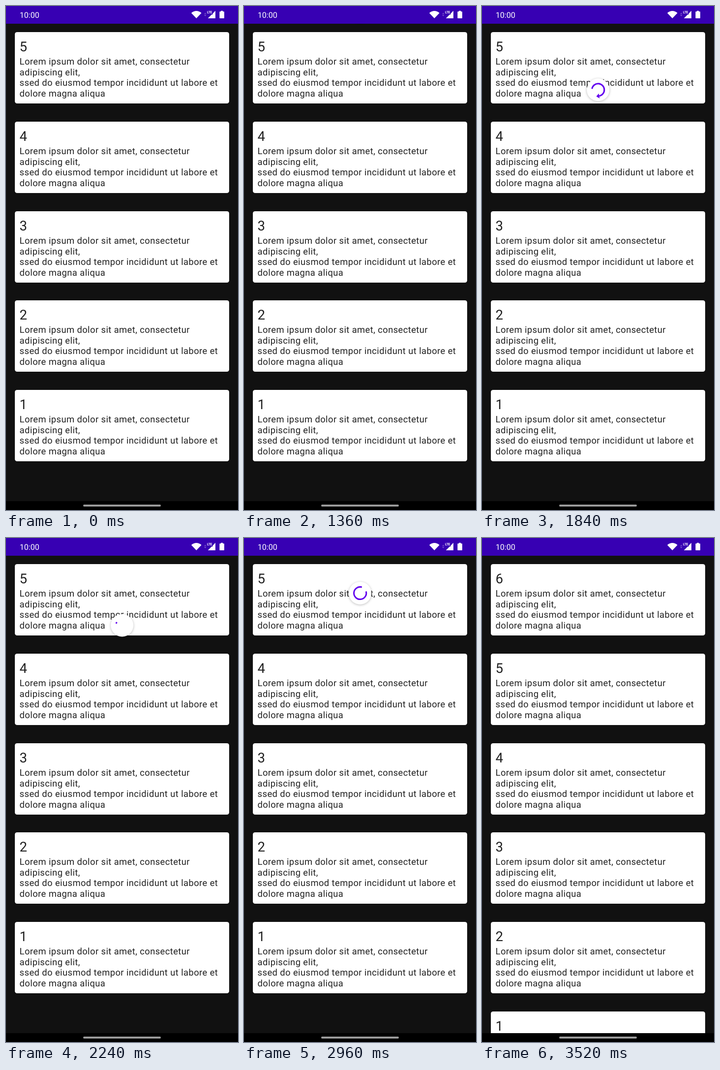
These frames come from a looping animation (472 px wide and 1024 px high, 4.56 s). An HTML page:

```html
<!DOCTYPE html>
<html lang="en">
<head>
<meta charset="utf-8">
<title>Pull to refresh</title>
<style>
  html, body { margin: 0; width: 100%; height: 100%; overflow: hidden; background: #111; }
  svg { display: block; width: 100%; height: 100%; font-family: Roboto, sans-serif; }
  text { text-rendering: geometricPrecision; }
  .digit { font-size: 27.55px; }
  .line { font-size: 18.37px; letter-spacing: .42px; }
  .card { fill: #212121; }
  .card rect { fill: #fff; }
  .disc { fill: #fff; filter: drop-shadow(0 1px 2.5px rgba(0, 0, 0, .27)); }
</style>
</head>
<body>
<svg viewBox="0 0 472 1024">
  <clipPath id="content"><rect y="36" width="472" height="970"/></clipPath>
  <rect width="472" height="1024" fill="#111"/>
  <g clip-path="url(#content)">
    <g id="list"></g>
    <g id="indicator">
      <circle class="disc" r="23"/>
      <g id="ring">
        <path id="arc" fill="none" stroke="#6200ee" stroke-width="3"/>
        <path id="head" d="M-5 0H5L0 6Z" fill="#6200ee"/>
      </g>
    </g>
  </g>
  <rect width="472" height="36" fill="#3700b3"/>
  <g fill="#fff">
    <text x="27.8" y="23.7" font-size="16.07">10:00</text>
    <path d="M377 14.2Q387.3 6 397.6 14.2L387.3 25Z"/>
    <path d="M403 16.4l2.3-3 2.3 3zM403 18l2.3 3 2.3-3z" opacity=".3"/>
    <path d="M426 9.8V25H410.8L418.6 17.2H420.6V15.2Z"/>
    <text x="409" y="15.4" font-size="6.8" font-weight="700" letter-spacing="-.3">LTE</text>
    <path d="M437.2 9.8h4v1.4h2a.8 .8 0 0 1 .8 .8v12.2a.8 .8 0 0 1-.8 .8h-8a.8 .8 0 0 1-.8-.8v-12.2a.8 .8 0 0 1 .8-.8h2z"/>
  </g>
  <rect y="1006" width="472" height="18" fill="#000"/>
  <rect x="157" y="1013" width="158" height="4" rx="2" fill="#9b9b9b"/>
</svg>
<script>
const LOOP = 4560, DATA_AT = 3280, SIXTH_AT = 3320;
const PULL_END = 2240, SPIN_START = 2276, HIDE_START = 3305, HIDE_END = 3505;
const REST_Y = 112, PULL_Y = 178, RADIUS = 12.6, CYCLE = 1332;
// [time, centre y] of the dragged indicator
const PULL = [[1360, 8], [1400, 28], [1480, 68], [1560, 103], [1680, 141], [1800, 166], [1880, 174.5], [2040, PULL_Y]];
const LINES = ['Lorem ipsum dolor sit amet, consectetur', 'adipiscing elit,',
  'ssed do eiusmod tempor incididunt ut labore et', 'dolore magna aliqua'];

const $ = id => document.getElementById(id);
const list = $('list'), indicator = $('indicator'), ring = $('ring'), arc = $('arc'), head = $('head');
const clamp = v => Math.min(1, Math.max(0, v));

list.innerHTML = Array.from({ length: 6 }, (_, i) => `
  <g class="card" transform="translate(0 ${Math.round(53.4 + i * 181.68)})">
    <rect x="18" width="436" height="145" rx="4.6"/>
    <text class="digit" x="27.6" y="38.8"></text>
    ${LINES.map((s, n) => `<text class="line" x="27.6" y="${66.3 + n * 21.45}">${s}</text>`).join('')}
  </g>`).join('');
const cards = [...list.children];
const digits = [...list.querySelectorAll('.digit')];

function track(points, t) {
  const i = points.findIndex(p => p[0] > t);
  if (i < 0) return points[points.length - 1][1];
  if (i === 0) return points[0][1];
  const [t0, a] = points[i - 1], [t1, b] = points[i];
  return a + (b - a) * (t - t0) / (t1 - t0);
}

// cubic-bezier(.4, 0, .2, 1), solved by bisection
function standardEase(x) {
  let lo = 0, hi = 1;
  for (let i = 0; i < 18; i++) {
    const s = (lo + hi) / 2, r = 1 - s;
    if (1.2 * r * r * s + .6 * r * s * s + s ** 3 < x) lo = s; else hi = s;
  }
  return lo * lo * (3 - 2 * lo);
}

function drawArc(start, sweep) {
  const point = deg => {
    const a = deg * Math.PI / 180;
    return `${(RADIUS * Math.cos(a)).toFixed(3)} ${(RADIUS * Math.sin(a)).toFixed(3)}`;
  };
  arc.setAttribute('d', `M${point(start)}A${RADIUS} ${RADIUS} 0 ${+(sweep > 180)} 1 ${point(start + sweep)}`);
}

function drawPull(y) {
  const start = 158 + (y - 141) * 1.08;
  const sweep = 250 * clamp(y / 110);
  drawArc(start, sweep);
  arc.setAttribute('stroke-linecap', 'butt');
  head.setAttribute('transform', `rotate(${start + sweep}) translate(${RADIUS} 0)`);
  head.style.display = '';
  ring.style.opacity = .3 + .7 * clamp((y - 95) / 25);
}

function drawSpinner(t) {
  const time = Math.max(0, t - SPIN_START), phase = time / CYCLE;
  const tail = 290 * standardEase(clamp(phase * 2 - 1));
  const tip = 290 * standardEase(clamp(phase * 2));
  drawArc(203 + 286 * phase + tail, Math.max(1, tip - tail));
  arc.setAttribute('stroke-linecap', 'square');
  head.style.display = 'none';
  ring.style.opacity = 1;
}

function render(t) {
  const top = t < DATA_AT ? 5 : 6;
  digits.forEach((d, i) => { d.textContent = top - i; });
  cards[5].style.display = t < SIXTH_AT ? 'none' : '';

  const visible = t > 1360 && t < HIDE_END;
  indicator.style.display = visible ? '' : 'none';
  if (!visible) return;
  let y;
  if (t < PULL_END) {
    y = track(PULL, t);
    drawPull(y);
  } else {
    const k = clamp((t - PULL_END) / 240);
    y = REST_Y + (PULL_Y - REST_Y) * (1 - k) ** 2;
    drawSpinner(t);
  }
  const scale = 1 - clamp((t - HIDE_START) / (HIDE_END - HIDE_START));
  indicator.setAttribute('transform', `translate(236.2 ${y}) scale(${scale})`);
}

const origin = performance.now();
function tick() {
  render((performance.now() - origin) % LOOP);
  requestAnimationFrame(tick);
}
tick();
</script>
</body>
</html>
```
